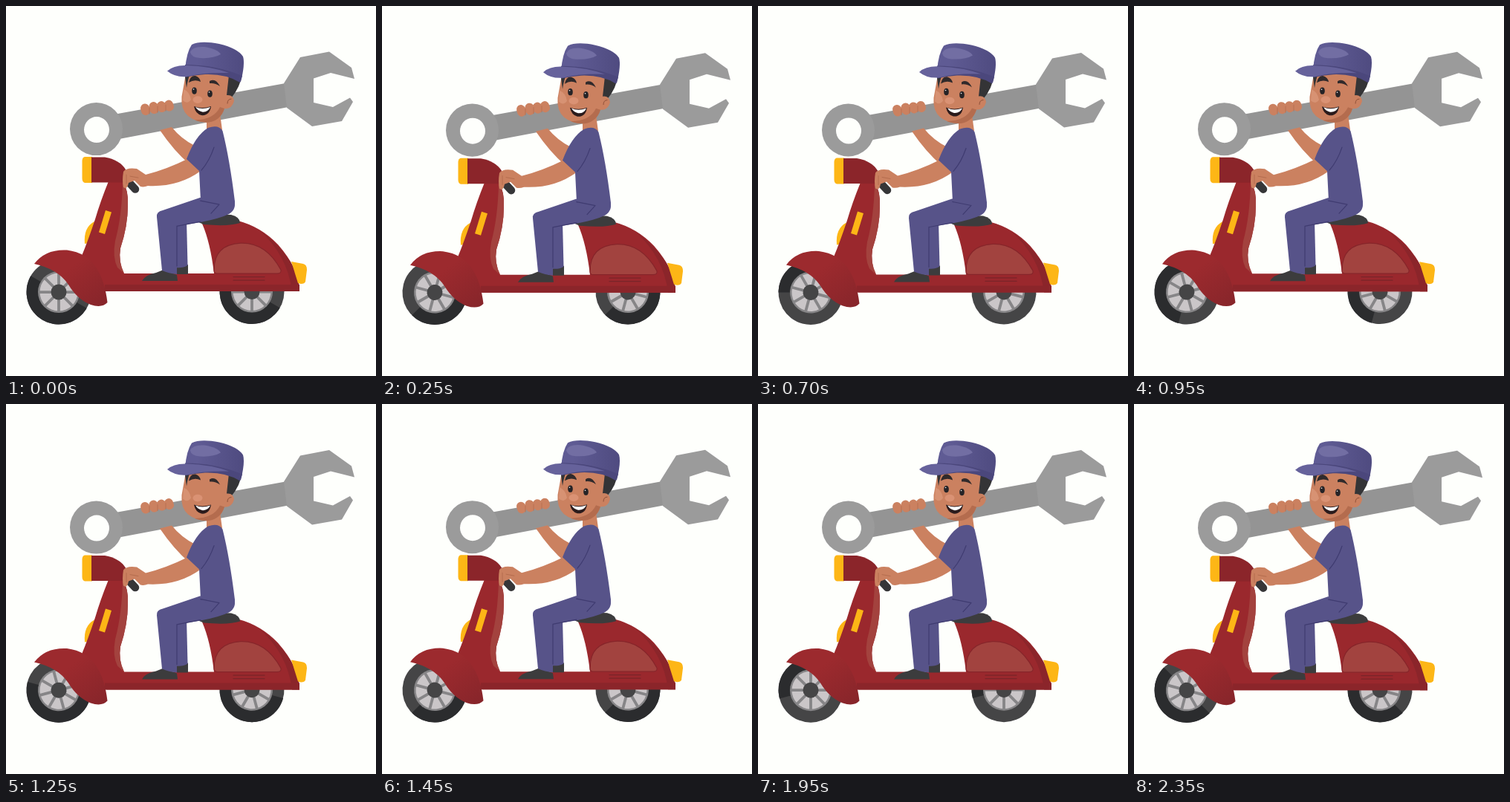
An HTML page that plays this animation: 498x498 px, repeating every 2.4 s.

```html
<!DOCTYPE html>
<html lang="en">
<head>
<meta charset="utf-8">
<title>Mechanic on a scooter</title>
<style>
html, body { margin: 0; width: 100%; height: 100%; overflow: hidden; background: #fefffc; }
svg { display: block; width: 100vw; height: 100vh; }
.skin { fill: #cb8160; }
.shade { fill: #b46c4e; }
.cloth { fill: #575389; }
.cloth-dark { fill: #4b477c; }
.dark { fill: #3c3c3d; }
.red { fill: #9a282d; }
.red-dark { fill: #8b252a; }
.yellow { fill: #fdb616; }
.line { fill: none; stroke-linecap: round; stroke-linejoin: round; }
.fold { stroke: #3f3b70; stroke-width: 1.2; }
</style>
</head>
<body>
<svg viewBox="0 0 498 498">
  <defs>
    <linearGradient id="guard" x1="0" y1="0" x2="1" y2="1">
      <stop offset=".4" stop-color="#9c2a2e"/><stop offset="1" stop-color="#86252a"/>
    </linearGradient>
    <linearGradient id="dome">
      <stop offset=".2" stop-color="#5f5b94"/><stop offset="1" stop-color="#4f4b80"/>
    </linearGradient>
    <g id="wheel">
      <circle r="43.5" fill="#454546"/>
      <path d="M37.700 21.750A43.500 43.500 0 0 1 -37.700 -21.750Z" fill="#2b2c2e"/>
      <circle r="28" fill="#868587"/>
      <circle r="25.5" fill="#cac6c8"/>
      <path id="spokes" stroke="#868587" stroke-width="3.800"/>
      <circle r="10.500" fill="#454546"/>
    </g>
  </defs>

  <g id="wheels">
    <g transform="translate(71 385)"><use class="spin" href="#wheel"/></g>
    <g transform="translate(331 384.500)"><use class="spin" href="#wheel"/></g>
  </g>

  <g id="rider">
    <!-- wrench -->
    <path fill="#949494" d="M145 146L376 104L380 136L147 180Z"/>
    <path fill="#9b9b9b" fill-rule="evenodd" d="M86 165.500a35 35 0 1 0 71 0a35 35 0 1 0 -71 0ZM105 166.500a17 17.500 0 1 1 34 0a17 17.500 0 1 1 -34 0Z"/>
    <path fill="#9b9b9b" d="M374 104L396 69L435 61.500L465 83L469 98L437 90L414 97.500V130L440 136L463 123.500L467 129L452 155L412 162L378 137Z"/>

    <!-- raised arm -->
    <path class="skin" d="M207 167L223 163Q236 179 254 188L247 213Q226 195 207 167Z"/>
    <path class="line" stroke="#cb8160" stroke-width="12" d="M187 137.500L188 141M198.500 135L199.500 139M209 134L210 137M219 132.500L220 135.500"/>
    <path class="line" stroke="#b46c4e" stroke-width=".8" d="M193 137V145M204 135V143M215 133V141"/>

    <!-- scooter -->
    <path class="yellow" d="M119 290Q104 298 106 320L116 318Z"/>
    <path class="red" d="M264 293Q275 318 280 360H159Q151 344 154 326Q164 296 164 268Q165 248 157 235L138 236Q127 263 120 287Q110 317 102 336L112 372L135 384H395Q395 354 366 321Q343 297 312 289Z"/>
    <path class="red-dark" d="M340 301Q395 341 395 384H385Q379 335 340 301Z"/>
    <path fill="#a3423e" d="M157 237Q165 248 164 268Q164 296 154 326Q151 344 159 360L150 352Q143 338 147 316Q156 283 157 237Z"/>
    <path class="yellow" d="M134 275L142 277.500L133 307L125 304.500Z"/>
    <path class="yellow" d="M106 203H116V238H106Q102.500 237 102.500 232V208Q103 203.500 106 203Z"/>
    <path class="red-dark" d="M115 203.500H133Q153 207 161 220L158 237.500H115Z"/>
    <path fill="url(#guard)" d="M38 347Q53 327 82 328.500Q109 332 122 353Q133 370 136.500 399Q129 407 114 402Q96 395 84 375Q70 354 38 347Z"/>
    <path class="red-dark" d="M133 375H395V384H133Z"/>
    <path fill="#a2433f" stroke="#86252a" stroke-width="1.200" d="M280 355Q280 321 316 319Q350 318 370 355Q371 360 365 360H284Q280 360 280 355Z"/>
    <path class="line" stroke="#792429" stroke-width="1.300" d="M306 364.500H348M306 369H348"/>
    <path class="yellow" d="M384 344L400 347Q405 348 405 355L403 371Q402 374 397 374L393 373Z"/>
    <path class="dark" d="M259 291Q280 279 303 281Q315 284 315 292Q300 297 266 294Z"/>

    <!-- legs -->
    <path class="dark" d="M230 351L245 348V361H230Z"/>
    <path class="cloth" d="M228 289H243L244.500 349Q238 353 229 352Z"/>
    <path class="dark" d="M183 370Q187 362 202 359L212 355L230 362L231 370Z"/>
    <path class="cloth" d="M203 284Q202 277 211 275L261 258L306 258Q312 273 300 280Q288 286 262 291L230 296L230 361Q219 360 210 356Z"/>
    <path class="line fold" d="M262 262L287 267M230 296V350M231 296L262 290"/>

    <!-- torso and steering arm -->
    <path class="skin" d="M270 148L288 145L291 167H270Z"/>
    <path class="line" stroke="#363638" stroke-width="10.500" d="M167 239L174 246.500"/>
    <path class="skin" d="M246 205Q216 220 188 227L176 219Q162 217 158 223Q156 235 158 244Q163 248 165 238L173 235L181 243Q186 244 191 242Q232 244 262 222V205Z"/>
    <path class="line" stroke="#b46c4e" stroke-width="1" d="M167 229L178 231M162 227V239"/>
    <path class="cloth" d="M272 164Q286 159 291.500 168Q301 206 308 263Q309 278 291 283L262 262L260 222L243 206Q255 174 272 164Z"/>
    <path class="line fold" d="M280 190Q274 208 263 221M262 262L287 267M276 279L287 267"/>

    <!-- head -->
    <path fill="#343436" d="M294 88L317 93Q316 108 303 124L295 119Z"/>
    <path class="skin" d="M243 86L300 93L297 120Q306 119 307 128Q304 139 294 138Q289 154 273 156.500Q256 157 245 148Q235 139 236.500 122Z"/>
    <path class="shade" d="M294 138Q289 154 273 156.500Q262 157 254 153.500Q280 153 288 136Z"/>
    <path fill="#343436" d="M240 88H249Q245 97 243 110Z"/>
    <path fill="#dc9a7c" opacity=".7" d="M239 112Q247 115 249 126Q244 133 238 127Z"/>
    <path class="line" stroke="#8f5139" stroke-width="1" d="M298 131Q298 125 303 125"/>
    <ellipse cx="258" cy="126" rx="6.500" ry="4.800" fill="#da9274"/>
    <path fill="#2b1b1c" d="M253 135Q264 139 276 135Q274 148 263 147Q255 145 253 135Z"/>
    <path fill="#fff" d="M255 136Q264 140 275 136Q272 143 264 142.500Q258 141 255 136Z"/>
    <g id="eyes">
      <ellipse cx="253.500" cy="114" rx="3.300" ry="4.700" fill="#252326"/>
      <ellipse cx="274.500" cy="118" rx="3.300" ry="4.700" fill="#252326"/>
      <path class="line" stroke="#fff" stroke-width="1.500" d="M252.500 112h.1M273.500 116h.1"/>
    </g>
    <path fill="#302a2b" d="M246 103Q248 93 255 94Q261 96 262 102Q254 98 246 103ZM274 101Q282 96 288 108Q281 103 274 104Z"/>

    <!-- cap -->
    <path fill="url(#dome)" d="M241 85Q243 62 250 52Q262 46 287 51Q312 57 319 68Q322 78 316 102Q309 94 295 92Z"/>
    <path fill="#726ea3" d="M248 62Q251 54 267 55Q285 58 289 65Q279 71 261 70Q249 69 248 62Z"/>
    <path class="cloth-dark" d="M241 79Q282 79 318 94L315 103Q296 91 268 92Q254 93 241 96Z"/>
    <path fill="#66629b" d="M217 87.500Q226 79 244 80Q275 81 300 90Q265 89 243 95Q227 96 217 87.500Z"/>
  </g>
</svg>
<script>
const LOOP = 2400, STEP = 50, SHAKES = 15, TURNS = 2;
const $ = id => document.getElementById(id);
const spin = document.querySelectorAll(".spin");

$("spokes").setAttribute("d", Array.from({ length: 8 }, (_, i) => {
  const a = i * Math.PI / 4;
  return `M0 0L${26 * Math.cos(a)} ${26 * Math.sin(a)}`;
}).join(""));

function draw(now) {
  const t = Math.floor(now % LOOP / STEP) * STEP;
  const p = t / LOOP;
  const y = .9 - .8 * Math.cos(p * SHAKES * 2 * Math.PI);
  const shut = t >= 1200 && t < 1350;
  $("rider").setAttribute("transform", `translate(0 ${y})`);
  $("wheels").setAttribute("transform", `translate(0 ${y * .3})`);
  spin.forEach(w => w.setAttribute("transform", `rotate(${-360 * TURNS * p})`));
  $("eyes").style.display = shut ? "none" : "";
}

const start = performance.now();
function tick() {
  draw(performance.now() - start);
  requestAnimationFrame(tick);
}
tick();
</script>
</body>
</html>
```
